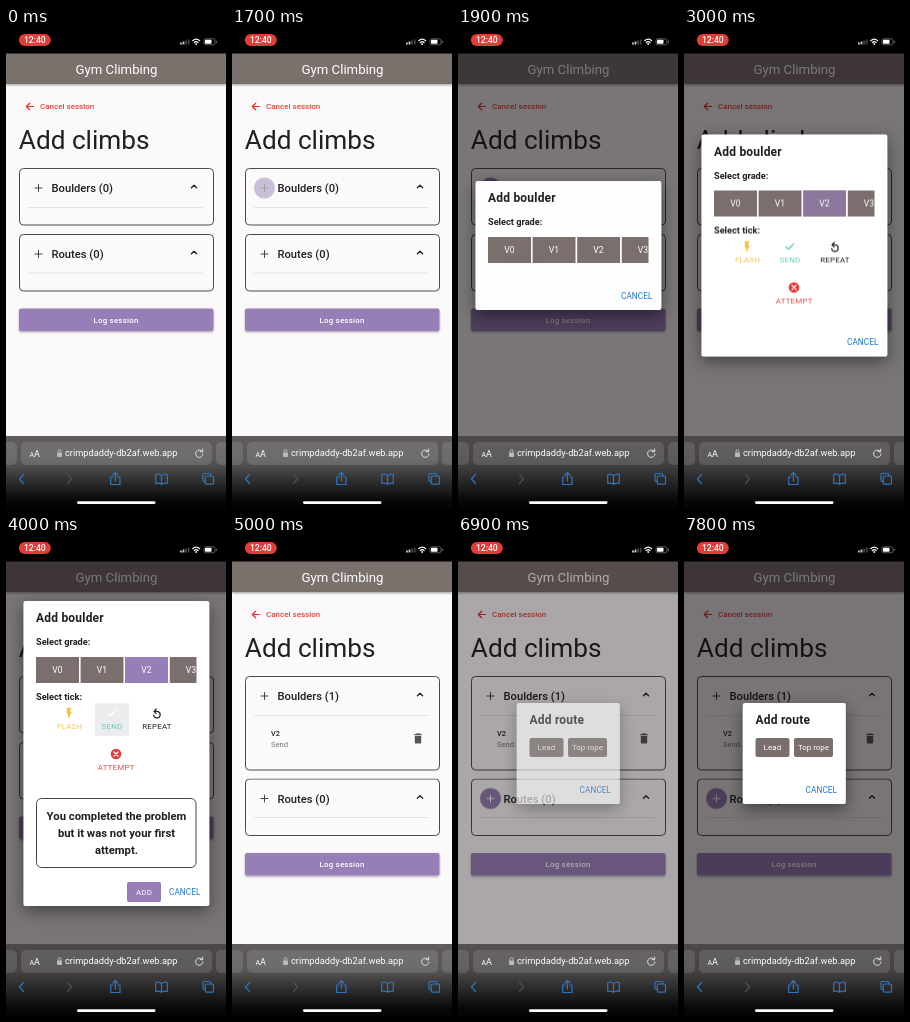
Animation, 220 px wide and 480 px high, one loop 8000 ms. Source, as an HTML page:

```html
<!DOCTYPE html>
<html lang="en">
<head>
<meta charset="utf-8">
<title>Climbing log</title>
<style>
  html, body { margin: 0; width: 100%; height: 100%; overflow: hidden; background: #000; }
  svg { display: block; width: 220px; height: 480px; }
  text { font-family: Roboto, "Noto Sans", sans-serif; fill: #221f22; }
  .mid { text-anchor: middle; }
  .h1 { font-size: 26.2px; }
  .h2 { font-size: 11.2px; font-weight: 500; }
  .title { font-size: 12px; font-weight: 700; letter-spacing: .2px; }
  .label { font-size: 9.2px; font-weight: 700; }
  .btn { font-size: 7.9px; letter-spacing: .22px; }
  .grade { font-size: 8.6px; }
  .med { font-weight: 500; }
  .white { fill: #fff; }
  .blue { fill: #1976d2; font-size: 8.2px; letter-spacing: .1px; }
  .line { fill: none; stroke-linecap: round; stroke-linejoin: round; }
  .card { fill: #fbf9fa; stroke: #4c494b; }
  .rule { stroke: #e5e2e4; }
  .ink { stroke: #222; stroke-width: 1.3; }
  .grey { fill: #7a6f6c; }
  .purple { fill: #977eb7; }

  /* one 8 s clock: 1% = 80 ms */
  .a { animation: 8s linear infinite; }
  .cut { animation-timing-function: step-end; }
  #before { animation-name: before; }
  #after { animation-name: after; }
  #shift { animation-name: shift; }
  #hoverA { animation-name: hoverA; }
  #hoverB { animation-name: hoverB; }
  #dim { animation-name: dim; }
  #boulder { animation-name: boulder; }
  #route { animation-name: route; }
  #panel { animation-name: panel; }
  #sheet { animation-name: sheet; }
  #foot { animation-name: foot; }
  #pick { animation-name: pick; }
  #ticks { animation-name: ticks; }
  .sent { animation-name: sent; }
  #check { animation-name: check; }

  @keyframes before { 0% { opacity: 1 } 62.375%, 100% { opacity: 0 } }
  @keyframes after { 0% { opacity: 0 } 62.375%, 100% { opacity: 1 } }
  @keyframes shift { 0% { transform: none } 62.375%, 100% { transform: translateY(36.5px) } }
  @keyframes hoverA { 0%, 20% { opacity: 0 } 22.6%, 62.37% { opacity: 1 } 62.375%, 100% { opacity: 0 } }
  @keyframes hoverB { 0%, 83.9% { opacity: 0 } 86%, 100% { opacity: 1 } }
  @keyframes dim {
    0% { opacity: 0 }
    21.25% { opacity: 0; animation-timing-function: cubic-bezier(.4, 0, .2, 1) }
    24.06%, 62.37% { opacity: .54 }
    62.375% { opacity: 0 }
    85.12% { opacity: 0; animation-timing-function: cubic-bezier(.4, 0, .2, 1) }
    87.93%, 100% { opacity: .54 }
  }
  @keyframes boulder {
    0% { opacity: 0 }
    21.25% { opacity: 0; animation-timing-function: cubic-bezier(.4, 0, .2, 1) }
    24.06%, 62.37% { opacity: 1 }
    62.375%, 100% { opacity: 0 }
  }
  @keyframes route {
    0% { opacity: 0 }
    85.12% { opacity: 0; animation-timing-function: cubic-bezier(.4, 0, .2, 1) }
    87.93%, 100% { opacity: 1 }
  }
  @keyframes panel {
    0% { transform: translateY(153px) }
    36.125% { transform: translateY(106.5px) }
    49.875%, 100% { transform: translateY(65px) }
  }
  @keyframes sheet { 0% { height: 129px } 36.125% { height: 222px } 49.875%, 100% { height: 305px } }
  @keyframes foot {
    0% { transform: translateY(129px) }
    36.125% { transform: translateY(222px) }
    49.875%, 100% { transform: translateY(305px) }
  }
  @keyframes pick { 0%, 35.5% { opacity: 0 } 38.6%, 100% { opacity: 1 } }
  @keyframes ticks { 0% { opacity: 0 } 36.125%, 100% { opacity: 1 } }
  @keyframes sent { 0% { opacity: 0 } 49.875%, 100% { opacity: 1 } }
  @keyframes check { 0% { stroke: #5fcdbb } 49.875%, 100% { stroke: #fff } }
</style>
</head>
<body>
<svg viewBox="0 0 220 480">
  <defs>
    <clipPath id="strip"><path d="M30 50H190.500V90H30Z"/></clipPath>
    <linearGradient id="glass" x2="0" y2="1">
      <stop offset="0" stop-color="#454140" stop-opacity=".85"/>
      <stop offset=".35" stop-color="#3f3c3c" stop-opacity=".87"/>
      <stop offset=".6" stop-color="#262526" stop-opacity=".94"/>
      <stop offset=".9" stop-color="#070708"/>
      <stop offset="1" stop-color="#040405"/>
    </linearGradient>
    <filter id="soft" x="-20%" y="-20%" width="140%" height="150%">
      <feDropShadow dx="0" dy="1.200" stdDeviation="1.200" flood-opacity=".35"/>
    </filter>
    <filter id="deep" x="-40%" y="-40%" width="180%" height="180%">
      <feDropShadow dx="0" dy="5" stdDeviation="8" flood-opacity=".45"/>
    </filter>
    <path id="plus" class="line" d="M-3.500 0H3.500M0 -3.500V3.500"/>
    <path id="up" class="line ink" d="M-2.600 1.300L0 -1.300L2.600 1.300"/>
  </defs>

  <rect y="24" width="220" height="456" fill="#fbf9fa"/>
  <rect y="20" width="220" height="36" class="grey" filter="url(#soft)"/>
  <text x="110.500" y="45.500" class="mid white" font-size="13.200">Gym Climbing</text>

  <path class="line" d="M27.500 78.500H20.500M23.700 75.200L20.300 78.500L23.700 81.800" stroke="#e5322d" stroke-width="1.200"/>
  <text x="34" y="81.300" font-size="8" class="med" style="fill:#e5453f">Cancel session</text>
  <text x="12.800" y="120.800" class="h1">Add climbs</text>

  <g class="a cut" id="before">
    <rect x="13.500" y="140.500" width="194" height="56.500" rx="4" class="card"/>
    <text x="45.500" y="164" class="h2">Boulders (0)</text>
  </g>
  <g class="a cut" id="after">
    <rect x="13.500" y="140.500" width="194" height="93.500" rx="4" class="card"/>
    <text x="45.500" y="164" class="h2">Boulders (1)</text>
    <text x="39" y="199.800" font-size="7.300" class="med">V2</text>
    <text x="39" y="210.500" font-size="7.600" style="fill:#777">Send</text>
    <path d="M182.300 198H189.700V199.200H182.300ZM184.500 197.200H187.500V198H184.500ZM182.800 200H189.200V206.500Q189.200 207.500 188.200 207.500H183.800Q182.800 207.500 182.800 206.500Z" fill="#555"/>
  </g>
  <path class="rule" d="M22 179.500H197"/>
  <use href="#plus" x="32.500" y="160" stroke="#444"/>
  <use href="#up" x="188" y="158.500"/>
  <g class="a" id="hoverA">
    <circle cx="32.500" cy="160" r="10.500" class="purple"/>
    <use href="#plus" x="32.500" y="160" stroke="#fff"/>
  </g>

  <g class="a cut" id="shift">
    <rect x="13.500" y="206.500" width="194" height="56.500" rx="4" class="card"/>
    <path class="rule" d="M22 245H197"/>
    <use href="#plus" x="32.500" y="226" stroke="#444"/>
    <use href="#up" x="188" y="224.500"/>
    <g class="a" id="hoverB">
      <circle cx="32.500" cy="226" r="10.500" class="purple"/>
      <use href="#plus" x="32.500" y="226" stroke="#fff"/>
    </g>
    <text x="45.500" y="230" class="h2">Routes (0)</text>
    <rect x="13" y="280.500" width="194.500" height="22.500" rx="2" class="purple" filter="url(#soft)"/>
    <text x="110" y="294.700" class="btn med mid white">Log session</text>
  </g>

  <rect id="dim" class="a" y="24" width="220" height="456" fill="#0c060b" opacity="0"/>

  <g class="a" id="boulder">
    <g class="a cut" id="panel">
      <rect class="a cut" id="sheet" x="17.500" width="185.800" height="129" rx="2" fill="#fff" filter="url(#deep)"/>
      <text x="30" y="21.200" class="title">Add boulder</text>
      <text x="30" y="44.200" class="label">Select grade:</text>
      <g clip-path="url(#strip)">
        <path class="grey" d="M30 56H73V82H30ZM74.600 56H117.500V82H74.600ZM119.200 56H162V82H119.200ZM163.800 56H206V82H163.800Z"/>
        <rect class="a purple" id="pick" x="119.200" y="56" width="42.800" height="26"/>
        <g class="grade mid">
          <text x="51.500" y="72" class="white">V0</text>
          <text x="96" y="72" class="white">V1</text>
          <text x="140.500" y="72" class="white">V2</text>
          <text x="185" y="72" class="white">V3</text>
        </g>
      </g>

      <g class="a cut" id="ticks">
        <text x="30" y="99" class="label">Select tick:</text>
        <rect class="a cut sent" x="89" y="102.500" width="34" height="32.500" fill="#ecebee"/>
        <path d="M60.800 106.800H65.300L63.900 110.800H66L62 118V113H60.800Z" fill="#f5bf45"/>
        <path id="check" class="a cut line" d="M102 112.300L104.500 114.800L109.500 109.500" stroke-width="1.300"/>
        <path class="line" d="M148.300 110.300H151.200A3.300 3.300 0 1 1 147.600 114M150.200 108L148 110.300L150.200 112.600" stroke="#222" stroke-width="1.200"/>
        <circle cx="110" cy="153" r="5.300" fill="#e23c3c"/>
        <path class="line" d="M108 151L112 155M112 151L108 155" stroke="#fff" stroke-width="1.200"/>
        <g class="btn mid">
          <text x="63.500" y="128" style="fill:#f5c451">FLASH</text>
          <text x="106" y="128" style="fill:#5fcdbb">SEND</text>
          <text x="151" y="128">REPEAT</text>
          <text x="110.200" y="168.800" style="fill:#e14b4b">ATTEMPT</text>
        </g>
      </g>

      <g class="a cut sent">
        <rect x="30.500" y="197.500" width="159.500" height="69" rx="5" fill="#fff" stroke="#444"/>
        <g class="mid" font-size="11.300" font-weight="700">
          <text x="110.500" y="218.800">You completed the problem</text>
          <text x="110.500" y="235.800">but it was not your first</text>
          <text x="110.500" y="252.800">attempt.</text>
        </g>
      </g>

      <g class="a cut" id="foot">
        <g class="a cut sent">
          <rect x="121" y="-24" width="34" height="20" rx="2" class="purple"/>
          <text x="138" y="-11.200" class="btn mid white">ADD</text>
        </g>
        <text x="163" y="-11.200" class="blue">CANCEL</text>
      </g>
    </g>
  </g>

  <g class="a" id="route">
    <rect x="58.800" y="167" width="103" height="101" rx="2" fill="#fff" filter="url(#deep)"/>
    <text x="71.500" y="188.200" class="title">Add route</text>
    <rect x="71.500" y="202" width="34" height="19" rx="2" class="grey"/>
    <rect x="110" y="202" width="39" height="19" rx="2" class="grey"/>
    <text x="88.500" y="214.300" class="btn mid white">Lead</text>
    <text x="129.500" y="214.300" class="mid white" font-size="7.900">Top rope</text>
    <text x="121.600" y="257" class="blue">CANCEL</text>
  </g>

  <!-- phone status bar -->
  <rect width="220" height="25.500"/>
  <rect x="12.800" y="6" width="32" height="12" rx="6" fill="#e23d38"/>
  <text x="28.800" y="15.200" class="mid white med" font-size="8.600">12:40</text>
  <path d="M174 14.500h1.800v2h-1.800ZM176.600 13.500h1.800v3h-1.800Z" fill="#ccc"/>
  <path d="M179.200 12.500h1.800v4h-1.800ZM181.800 11.500h1.800v5h-1.800Z" fill="#444"/>
  <path class="line" d="M186.700 12.700Q190.200 9.700 193.700 12.700M188.300 14.500Q190.200 12.900 192.100 14.500" stroke="#fff" stroke-width="1.200"/>
  <circle cx="190.200" cy="16" r=".9" fill="#fff"/>
  <rect x="198" y="10.800" width="11" height="6" rx="1.800" fill="none" stroke="#777" stroke-width=".8"/>
  <rect x="199" y="11.800" width="6.500" height="4" rx=".8" fill="#fff"/>
  <path d="M210.400 12.800v2" stroke="#777"/>

  <!-- translucent browser bar -->
  <rect y="408" width="220" height="72" fill="url(#glass)"/>
  <g fill="#fff" fill-opacity=".12">
    <rect x="-10" y="414" width="21" height="23" rx="5"/>
    <rect x="15" y="414" width="191" height="23" rx="5"/>
    <rect x="210" y="414" width="21" height="23" rx="5"/>
  </g>
  <text x="23.500" y="428.500" class="white" font-size="7">A<tspan font-size="9">A</tspan></text>
  <rect x="51" y="424.500" width="5" height="4.500" rx=".8" fill="#bbb"/>
  <path class="line" d="M52.100 424.500V423A1.400 1.400 0 0 1 54.900 423V424.500" stroke="#bbb" stroke-width=".9"/>
  <text x="59" y="428.300" class="white" font-size="9.250">crimpdaddy-db2af.web.app</text>
  <path class="line" d="M196.300 423.500A3.700 3.700 0 1 0 197 426M194 423.700H196.700V421" stroke="#ddd"/>
  <g class="line" stroke="#2f74bd" stroke-width="1.200">
    <path d="M17.500 446.500L13.500 451L17.500 455.500"/>
    <path d="M61.500 446.500L65.500 451L61.500 455.500" stroke="#4c4e52"/>
    <path d="M107 449H104.700V456.500H114V449H111.700M109.400 453V444.500M106.900 447L109.400 444.500L111.900 447"/>
    <path d="M155.500 447.500Q152.500 445.200 149.700 446.500V455.500Q152.500 454.300 155.500 456.300Q158.500 454.300 161.300 455.500V446.500Q158.500 445.200 155.500 447.500V456.300"/>
    <path d="M199 453.300H198Q197 453.300 197 452.300V446.500Q197 445.500 198 445.500H203.800Q204.800 445.500 204.800 446.500V448"/>
    <rect x="199.300" y="448" width="8.200" height="8.200" rx="1.300"/>
  </g>
  <rect x="71" y="473.300" width="78.500" height="2.600" rx="1.300" fill="#fff"/>
</svg>
</body>
</html>
```
